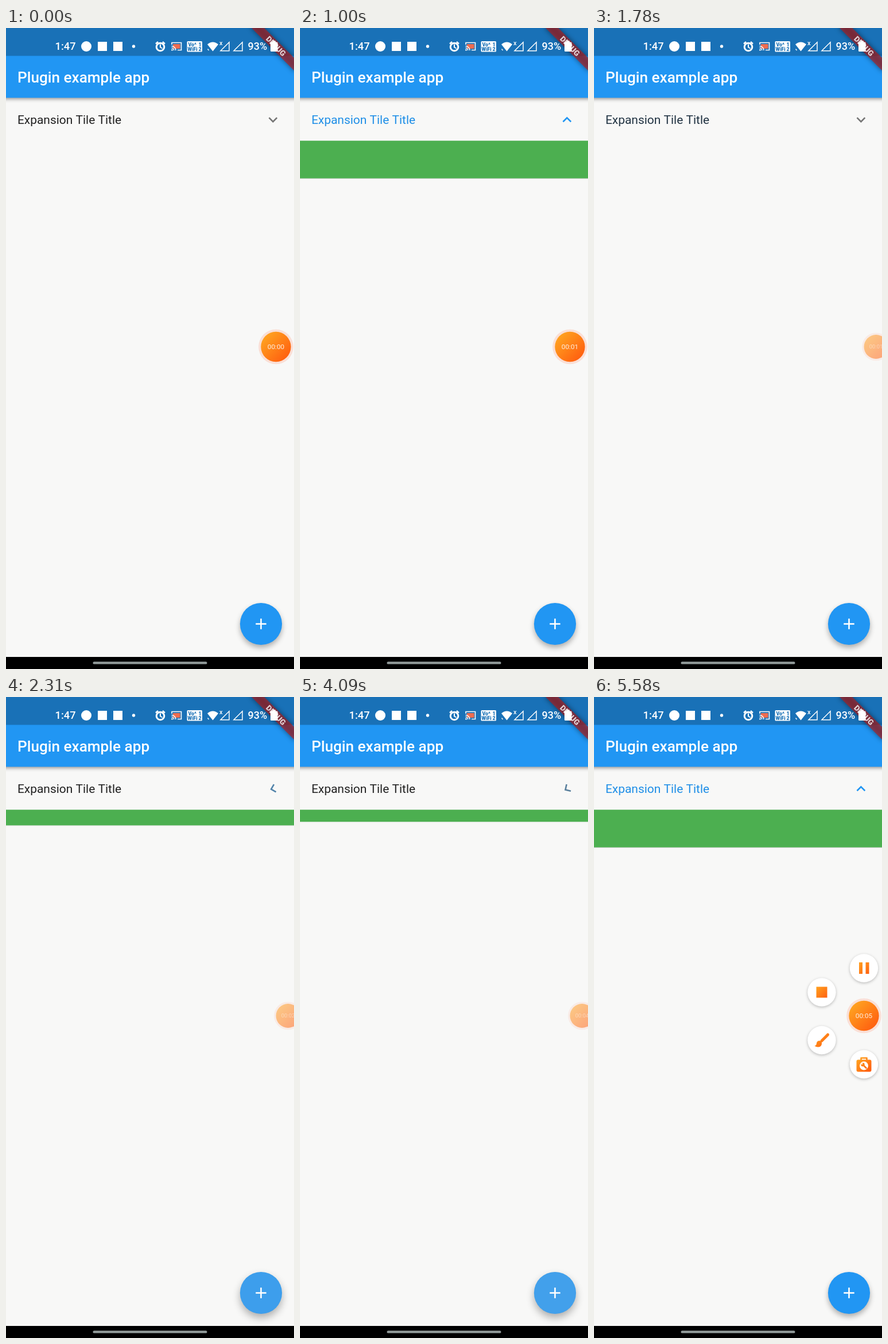
An HTML page with a canvas for the animation above (5.61 s loop, 502 px wide and 1116 px high).

```html
<!DOCTYPE html>
<html lang="en">
<head>
<meta charset="utf-8">
<title>Expansion tile demo</title>
<style>
  html, body { margin: 0; width: 100%; height: 100%; overflow: hidden; background: #f8f8f7; }
  canvas { display: block; width: 502px; height: 1116px; }
</style>
</head>
<body>
<canvas id="stage" width="502" height="1116"></canvas>
<script>
const ctx = document.getElementById('stage').getContext('2d');
const W = 502, H = 1116, LOOP = 5610, DP = 1.307;
const BLUE = [33, 150, 243], TEXT_BLUE = [30, 142, 231];
const FAB = { x: 444.5, y: 1037.5, r: 36.6 };
const HUB = { x: 470.5, y: 555 };
const TAPS = [[250, 340], [1370, 1414], [2130, 2193], [3060, 3114], [3900, 3990]]
  .map(([down, up]) => ({ down, up }));
const MENU = [
  { x: 470.5, y: 472, icon: pauseIcon },
  { x: 397, y: 514, icon: stopIcon },
  { x: 397, y: 597.5, icon: brushIcon },
  { x: 470.5, y: 639.5, icon: toolboxIcon }
];

const clamp = v => Math.max(0, Math.min(1, v));
const mix = (a, b, k) => a + (b - a) * k;
const span = (t, from, to) => clamp((t - from) / (to - from));
const smooth = k => k * k * (3 - 2 * k);
const easeOut = k => 1 - (1 - k) ** 3;
const mixColor = (a, b, k) => `rgb(${a.map((v, i) => Math.round(mix(v, b[i], k)))})`;

// cubic-bezier(.42, 0, 1, 1)
function easeIn(x) {
  let lo = 0, hi = 1;
  for (let i = 0; i < 20; i++) {
    const s = (lo + hi) / 2;
    const bx = 1.26 * (1 - s) ** 2 * s + 3 * (1 - s) * s * s + s ** 3;
    if (bx < x) lo = s; else hi = s;
  }
  return 3 * (1 - lo) * lo * lo + lo ** 3;
}

// Progress of a value that every tap flips, starting `delay` ms after release.
function toggled(t, delay) {
  let value = 0;
  TAPS.forEach((tap, i) => {
    const start = tap.up + delay;
    if (t >= start) {
      const k = span(t, start, start + 200);
      value = i % 2 ? 1 - k : k;
    }
  });
  return value;
}

function rect(x, y, w, h, color, radius = 0) {
  ctx.fillStyle = color;
  ctx.beginPath();
  ctx.roundRect(x, y, w, h, radius);
  ctx.fill();
}

function disc(x, y, r, color) {
  ctx.fillStyle = color;
  ctx.beginPath();
  ctx.arc(x, y, r, 0, Math.PI * 2);
  ctx.fill();
}

function line(points, color, width, close) {
  ctx.strokeStyle = color;
  ctx.lineWidth = width;
  ctx.beginPath();
  points.forEach(([x, y]) => ctx.lineTo(x, y));
  if (close) ctx.closePath();
  ctx.stroke();
}

function arc(x, y, r, from, to, width, color = '#fff') {
  ctx.strokeStyle = color;
  ctx.lineWidth = width;
  ctx.beginPath();
  ctx.arc(x, y, r, from, to);
  ctx.stroke();
}

function label(text, x, y, size, color, weight = 400, align = 'left') {
  ctx.font = `${weight} ${size}px Roboto, sans-serif`;
  ctx.fillStyle = color;
  ctx.textAlign = align;
  ctx.fillText(text, x, y);
}

function withShadow(alpha, blur, dy, draw) {
  ctx.save();
  ctx.shadowColor = `rgba(0,0,0,${alpha})`;
  ctx.shadowBlur = blur;
  ctx.shadowOffsetY = dy;
  draw();
  ctx.restore();
}

function orange(r) {
  const g = ctx.createLinearGradient(-r, -r, r, r);
  g.addColorStop(0.12, '#ffa320');
  g.addColorStop(0.88, '#ff5f10');
  return g;
}

function drawTile(t) {
  const open = easeIn(toggled(t, 0));
  const textBlue = toggled(t, 200);
  if (open > 0) {
    const top = 196.3, height = 65.4 * open;
    rect(0, top, W, height, '#4caf50');
    rect(0, top + height, W, 1.3, `rgba(0,0,0,${0.12 * open})`);
  }
  label('Expansion Tile Title', 19.9, 167, 20.95, mixColor([33, 33, 33], TEXT_BLUE, textBlue));

  ctx.save();
  ctx.translate(465.4, 159.7);
  ctx.rotate(Math.PI * open);
  ctx.scale(DP, DP);
  ctx.fillStyle = mixColor([117, 117, 117], BLUE, open);
  ctx.beginPath();
  [[4.59, -3.41], [0, 1.17], [-4.59, -3.41], [-6, -2], [0, 4], [6, -2]]
    .forEach(([x, y]) => ctx.lineTo(x, y));
  ctx.fill();
  ctx.restore();
}

function drawAppBar() {
  withShadow(0.38, 6, 2, () => rect(-10, 0, W + 20, 121.6, '#2196f3'));
  rect(0, 0, W, 48.4, '#1971b7');
  label('Plugin example app', 20, 95, 26.15, '#fff', 500);
}

function drawBanner() {
  ctx.save();
  ctx.translate(W, 0);
  ctx.rotate(Math.PI / 4);
  withShadow(0.75, 10, 0, () => rect(-54, 36.6, 108, 15.7, 'rgba(183,28,28,.63)'));
  label('DEBUG', 0, 49.2, 13.3, 'rgba(255,255,255,.8)', 900, 'center');
  ctx.restore();
}

function drawStatusIcons() {
  const white = '#fff';
  label('1:47', 85.5, 38.3, 18.3, white, 500);
  disc(140, 32, 9, white);
  rect(160, 24, 16, 16, white);
  rect(187, 24, 16, 16, white);
  disc(222.5, 32, 2.7, white);

  // alarm
  arc(269, 33, 6.8, 0, Math.PI * 2, 3);
  line([[261, 27.5], [265, 24]], white, 2.4);
  line([[277, 27.5], [273, 24]], white, 2.4);
  line([[269, 28.5], [269, 33.5], [272.5, 35.5]], white, 2);

  // cast
  rect(291, 28, 12.5, 8, '#ef6c50');
  line([[289, 29], [289, 25.5], [305.5, 25.5], [305.5, 38.5], [299, 38.5]], white, 1.6);
  arc(288.5, 39, 7.5, -Math.PI / 2, 0, 1.5);
  arc(288.5, 39, 4.2, -Math.PI / 2, 0, 1.5);
  disc(289.5, 38.3, 1.3, white);

  // calling badge
  rect(315.5, 23, 26.5, 18.5, white, 1.5);
  label('Vo^', 317.5, 31.5, 8.8, '#1971b7', 900);
  label('1', 335.5, 31.5, 8.8, '#1971b7', 900);
  label('WiFi', 316.5, 40, 8.8, '#1971b7', 900);
  label('2', 335.5, 40, 8.8, '#1971b7', 900);

  // wifi
  ctx.fillStyle = white;
  ctx.beginPath();
  ctx.moveTo(360.5, 40.5);
  ctx.lineTo(351, 28.5);
  ctx.quadraticCurveTo(360.5, 20.5, 370, 28.5);
  ctx.fill();
  line([[351.5, 36.5], [353.5, 39]], white, 1.3);

  label('x', 372, 29.5, 11, white, 500);
  for (const x of [374, 397]) {
    line([[x, 39.8], [x + 15, 39.8], [x + 15, 24.8]], white, 1.5, true);
  }
  label('93%', 421.5, 38.3, 18, white, 500);
  rect(464.5, 22.5, 5.5, 3, white);
  rect(461, 24.5, 12.5, 16.5, white, 1.5);
}

function drawFab(t) {
  const lift = Math.max(...TAPS.map(({ down, up }) =>
    span(t, down, up + 60) * (1 - span(t, up + 100, up + 300))));
  withShadow(0.3, 10 + 4 * lift, 5 + 2 * lift, () => disc(FAB.x, FAB.y, FAB.r, '#2196f3'));

  for (const { down, up } of TAPS) {
    if (t < down || t > up + 200) continue;
    const grow = clamp((Math.min(t, up) - down) / 1000 + Math.max(0, t - up) / 44);
    const fade = 0.4 * (1 - span(t, up, up + 200));
    ctx.save();
    ctx.beginPath();
    ctx.arc(FAB.x, FAB.y, FAB.r, 0, Math.PI * 2);
    ctx.clip();
    disc(FAB.x + 11 * (1 - grow), FAB.y - 29 * (1 - grow), 52 * grow, `rgba(200,200,200,${fade})`);
    ctx.restore();
  }
  rect(FAB.x - 9.2, FAB.y - 1.3, 18.4, 2.6, '#fff');
  rect(FAB.x - 1.3, FAB.y - 9.2, 2.6, 18.4, '#fff');
}

function pauseIcon(fill) {
  rect(-8.5, -10, 6, 20, fill);
  rect(3, -10, 6, 20, fill);
}

function stopIcon(fill) {
  rect(-9.5, -9.5, 19, 19, fill);
}

function brushIcon(fill) {
  ctx.lineCap = 'round';
  line([[10.5, -9.5], [0, 1]], fill, 5);
  ctx.fillStyle = fill;
  ctx.beginPath();
  ctx.moveTo(-12.5, 10);
  ctx.quadraticCurveTo(-9, 9, -9, 5);
  ctx.bezierCurveTo(-8, -1, 1, 0, 0, 6.5);
  ctx.bezierCurveTo(-1, 13, -8, 13, -12.5, 10);
  ctx.fill();
}

function toolboxIcon(fill) {
  ctx.lineJoin = 'round';
  line([[-5, -7], [-5, -11], [5, -11], [5, -7]], fill, 2.6);
  rect(-13, -8, 26, 21, fill, 3);
  disc(0, 2.5, 7.5, '#fff');
  ctx.lineCap = 'round';
  line([[-1, 1.5], [4, 6.5]], fill, 2.6);
  disc(-2, 0.5, 3.2, fill);
  disc(-3.6, -1.1, 1.4, '#fff');
}

function drawMenu(t) {
  const k = easeOut(span(t, 4740, 4930));
  if (k === 0) return;
  for (const { x, y, icon } of MENU) {
    ctx.save();
    ctx.globalAlpha = k;
    ctx.translate(mix(HUB.x, x, k), mix(HUB.y, y, k));
    ctx.scale(k, k);
    withShadow(0.25, 5, 1.5, () => disc(0, 0, 24.7, '#fff'));
    icon(orange(13));
    ctx.restore();
  }
}

function drawBubble(t) {
  const back = easeOut(span(t, 4740, 4860));
  const dock = smooth(span(t, 1160, 1620)) * (1 - back);
  const dim = span(t, 1150, 1300) * (1 - back);
  const scale = mix(1, 0.8, dock);
  ctx.save();
  ctx.globalAlpha = mix(1, 0.5, dim);
  ctx.translate(HUB.x + 21 * dock, HUB.y);
  ctx.scale(scale, scale);
  disc(0, 0, 30.3, 'rgba(255,120,80,.2)');
  disc(0, 0, 26.2, orange(26));
  label('00:0' + Math.floor(t / 1000), 0, 4.3, 11.8, 'rgba(255,255,255,.88)', 400, 'center');
  ctx.restore();
}

function drawNavBar() {
  rect(0, 1095, W, H - 1095, '#000');
  rect(151.5, 1103.2, 199, 4.4, '#929b9a', 2.2);
}

function frame() {
  const t = performance.now() % LOOP;
  rect(0, 0, W, H, '#f8f8f7');
  drawTile(t);
  drawAppBar();
  drawBanner();
  drawStatusIcons();
  drawFab(t);
  drawNavBar();
  drawMenu(t);
  drawBubble(t);
  requestAnimationFrame(frame);
}
frame();
</script>
</body>
</html>
```
